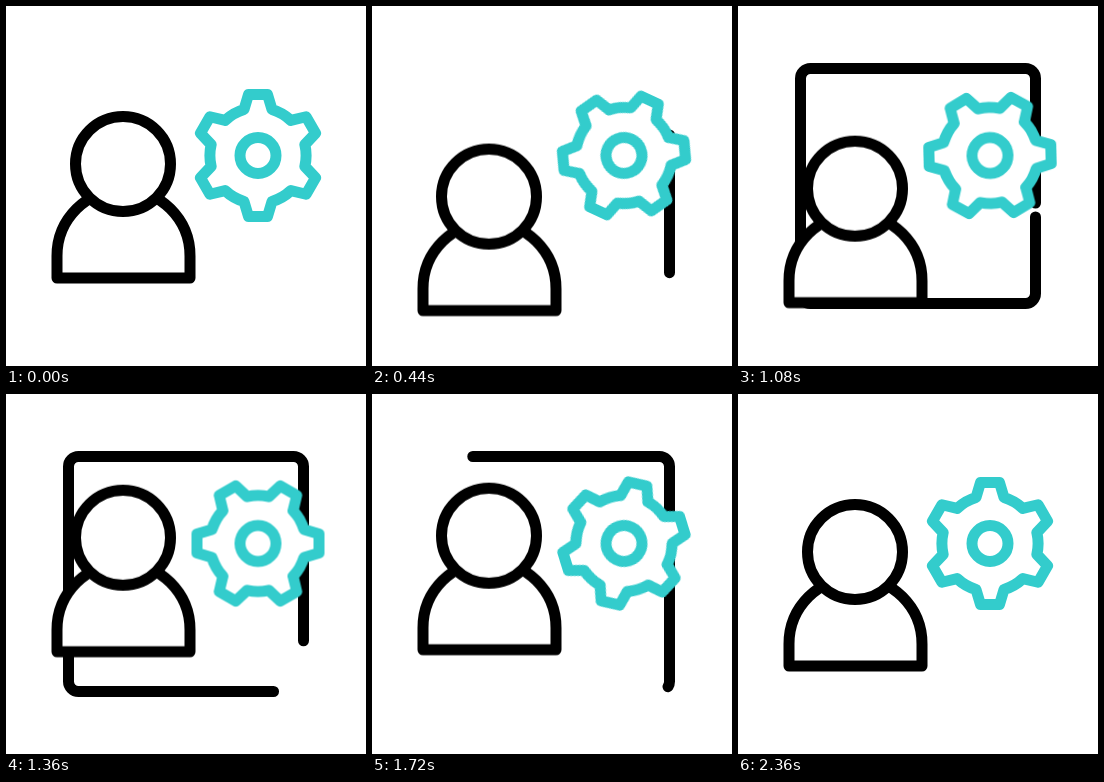
Recreate the animation shown at these times as an HTML page. Size 360 by 360 pixels, loop 2.48 s.

```html
<!DOCTYPE html>
<html lang="en">
<head>
<meta charset="utf-8">
<title>User settings</title>
<style>
  @property --head { syntax: "<number>"; inherits: false; initial-value: 0; }
  @property --tail { syntax: "<number>"; inherits: false; initial-value: 0; }
  @property --drift { syntax: "<number>"; inherits: false; initial-value: 0; }

  html, body { margin: 0; width: 100%; height: 100%; overflow: hidden; background: #fff; }
  svg { display: block; width: 100%; height: 100%; }

  .line { fill: #fff; stroke: #000; stroke-width: 11; stroke-linecap: round; stroke-linejoin: round; }
  .teal { stroke: #33cccc; }

  /* Trimmed outline: visible from tail to head, while the whole run drifts on */
  #frame {
    fill: none;
    stroke-dasharray: calc((var(--head) - var(--tail)) * 1000px) calc((1 - var(--head) + var(--tail)) * 1000px);
    stroke-dashoffset: calc((var(--drift) + var(--tail)) * -1000px);
    animation: head 2480ms infinite, tail 2480ms infinite,
               drift 2480ms linear infinite, show 2480ms step-end infinite;
  }
  #user { animation: bob 2480ms cubic-bezier(.65, 0, .15, 1) infinite; }
  #gear { transform-origin: 252px 149.5px; animation: turn 2480ms infinite; }

  @keyframes head {
    0%, .4% { --head: 0; animation-timing-function: cubic-bezier(.7, 0, .3, 1); }
    50.4%, 100% { --head: 1; }
  }
  @keyframes tail {
    0%, 47.58% { --tail: 0; animation-timing-function: cubic-bezier(.333, 0, .667, 1); }
    88.91%, 100% { --tail: 1; }
  }
  @keyframes drift {
    from { --drift: 0; }
    to { --drift: .3444; }
  }
  @keyframes show {
    0% { visibility: hidden; }
    4.8% { visibility: visible; }
    88.7%, 100% { visibility: hidden; }
  }
  @keyframes bob {
    0%, .4% { transform: translateY(0); }
    32.26% { transform: translateY(40.5px); }
    63.31% { transform: translateY(-17px); }
    95.16%, 100% { transform: translateY(0); }
  }
  @keyframes turn {
    0% { transform: rotate(0deg); animation-timing-function: cubic-bezier(.45, 0, .55, 1); }
    47.98%, 57.66% { transform: rotate(90deg); animation-timing-function: cubic-bezier(.5, 0, .5, 1); }
    93.95%, 100% { transform: rotate(0deg); }
  }
</style>
</head>
<body>
<svg viewBox="0 0 360 360">
  <path id="frame" class="line" pathLength="1000"
    d="M297.5 72.5V287.5A10 10 0 0 1 287.5 297.5H72.5A10 10 0 0 1 62.5 287.5V72.5A10 10 0 0 1 72.5 62.5H287.5A10 10 0 0 1 297.5 72.5Z"/>
  <g id="user" class="line">
    <path d="M51 272V250A66.5 66.5 0 0 1 184 250V272Z"/>
    <circle cx="117" cy="158" r="47.5"/>
  </g>
  <g id="gear" class="line teal">
    <path id="rim"/>
    <circle cx="252" cy="149.5" r="18"/>
  </g>
</svg>
<script>
  // Six equal teeth, joined by shallow arcs
  const tooth = [[-14, -46], [-9.5, -61], [9.5, -61], [14, -46]];
  let d = "";
  for (let i = 0; i < 6; i++) {
    const c = Math.cos(i * Math.PI / 3), s = Math.sin(i * Math.PI / 3);
    tooth.forEach(([x, y], k) => {
      const cmd = k ? "L" : i ? "A48 48 0 0 1 " : "M";
      d += cmd + (252 + x * c - y * s).toFixed(2) + " " + (149.5 + x * s + y * c).toFixed(2);
    });
  }
  d += "A48 48 0 0 1 238 103.5Z";
  document.getElementById("rim").setAttribute("d", d);
</script>
</body>
</html>
```
